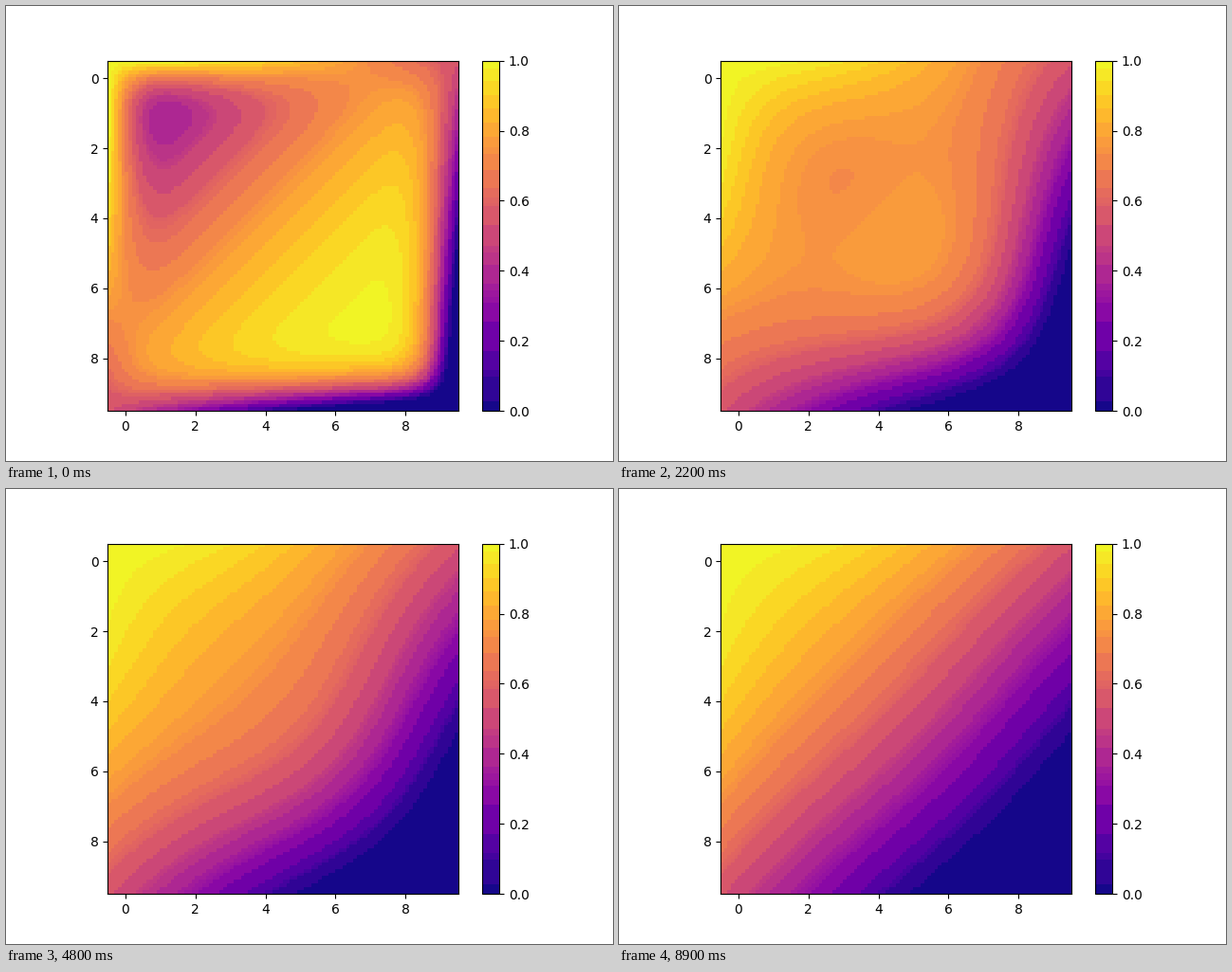
A matplotlib script for the animation above (9 s loop, 640x480 px).

```python
import numpy as np
import matplotlib.pyplot as plt
from matplotlib.animation import FuncAnimation
from matplotlib.colors import ListedColormap

N = 100             # grid points per side
FRAMES = 90
INTERVAL = 100      # ms
DT = 2e-5
STEPS = 50          # solver steps per picture
WARMUP = 100        # steps before the first picture


def banded(name):
    """Colormap whose similar neighbouring colours merge into flat bands."""
    rgb = np.round(plt.get_cmap(name)(np.arange(256))[:, :3] * 255).astype(int)
    keys = rgb // np.array([32, 16, 32])
    out = np.empty((256, 3))
    for key in np.unique(keys, axis=0):
        same = (keys == key).all(axis=1)
        out[same] = rgb[same].mean(axis=0) / 255
    return ListedColormap(out)


def start_field():
    """sin(x + y) inside, cos(x + y) held on the border."""
    x = np.linspace(0, 1, N)
    s = x[:, None] + x[None, :]
    u = np.cos(s)
    u[1:-1, 1:-1] = np.sin(s)[1:-1, 1:-1]
    return u


def diffuse(u, steps):
    r = DT * (N - 1) ** 2
    for _ in range(steps):
        c = u[1:-1, 1:-1]
        u[1:-1, 1:-1] = c + r * (u[2:, 1:-1] + u[:-2, 1:-1]
                                 + u[1:-1, 2:] + u[1:-1, :-2] - 4 * c)


def solve():
    u = start_field()
    diffuse(u, WARMUP)
    fields = []
    for _ in range(FRAMES):
        diffuse(u, STEPS)
        fields.append(u.copy())
    return fields


fields = solve()

fig, ax = plt.subplots(figsize=(6.4, 4.8), dpi=100)
image = ax.imshow(fields[0], cmap=banded("plasma"), vmin=0, vmax=1,
                  extent=(-0.5, 9.5, 9.5, -0.5), interpolation="nearest")
fig.colorbar(image)


def update(i):
    image.set_data(fields[i])
    return [image]


anim = FuncAnimation(fig, update, frames=FRAMES, interval=INTERVAL,
                     repeat=True, repeat_delay=0)
plt.show()
```
